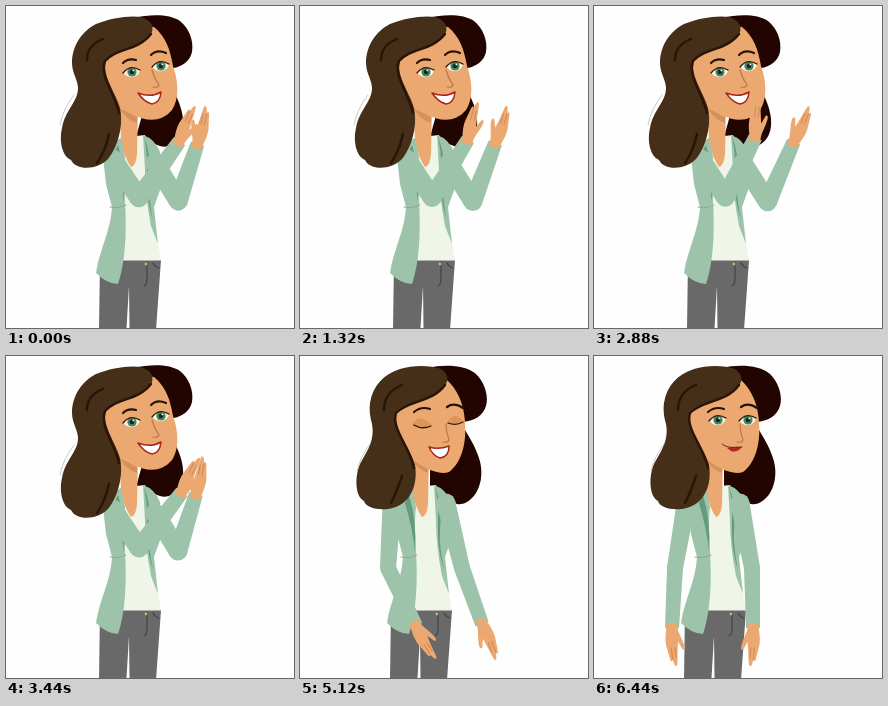
An HTML page for the animation above (6520 ms loop, 288 by 322 pixels).

```html
<!DOCTYPE html>
<html lang="en">
<head>
<meta charset="utf-8">
<title>Clapping woman</title>
<style>
  html, body { margin: 0; width: 100%; height: 100%; overflow: hidden; background: #fefefe; }
  svg { display: block; width: 100vw; height: 100vh; }
  .back { fill: #220500; }
  .hair { fill: #452f18; }
  .skin { fill: #eba870; }
  .jacket { fill: #9dc4aa; }
  .fold { fill: #649b7d; }
  .line { fill: none; stroke-linecap: round; stroke-linejoin: round; }
  .strand { stroke: #291407; stroke-width: 2.4; }
  .brow { stroke: #2a1206; stroke-width: 2.2; }
  .lash { stroke: #2b1a12; stroke-width: 1.3; }
  .crease { stroke: #bd7647; stroke-width: 1.2; }
  .seam { stroke: #8baa94; stroke-width: 1; }
  .grin { fill: #fff; stroke: #a9241c; stroke-width: 1.5; stroke-linejoin: round; }
</style>
</head>
<body>
<svg viewBox="0 0 288 322" preserveAspectRatio="none">
  <defs>
    <g id="eye">
      <path d="M-9,1 Q-2,-7 8,-1 Q5,6 -2,5 Q-6,4 -9,1Z" fill="#f6f7ef"/>
      <circle r="4.6" fill="#42865e"/>
      <circle r="2.3" fill="#14251c"/>
      <circle cx="1.4" cy="-1.6" r=".9" fill="#fff"/>
      <path class="line lash" d="M-9,1 Q-2,-8 8,-2"/>
    </g>
    <g id="hand">
      <path class="skin" d="M-5,5 C-6,-3 -8,-9 -7,-17 L-4,-31 Q-3,-35 -1.5,-32 L0,-37 Q2,-40 3,-36 L4,-23 L5,-14 L9,-22 Q12,-23 11,-18 C9,-9 5,-5 5,5Z"/>
      <path class="line crease" d="M-1.5,-31 L-2,-20 M2,-30 L1.5,-20" style="stroke-width:.6"/>
    </g>
  </defs>

  <g id="clapBack" class="back">
    <path d="M128,12 C144,8 164,8 174,15 C183,22 188,35 186,46 C184,55 176,61 167,62 L146,26Z"/>
    <path d="M140,95 L168,86 C178,104 180,122 173,132 C167,140 160,142 154,140 L130,131Z"/>
  </g>
  <g id="restBack" class="back">
    <path d="M128,12 C144,8 166,9 176,18 C184,26 189,39 186,50 C183,60 174,65 162,66 L146,26Z"/>
    <path d="M160,66 C172,85 184,104 181,122 C179,139 167,150 157,148 C142,143 132,140 130,130 L130,95Z"/>
  </g>

  <g id="body">
    <path d="M94,254 H155 L150,324 H93Z" fill="#69696a"/>
    <path d="M123,280 L120.500,322 H123.500Z" fill="#fefefe"/>
    <path class="line" d="M141,256 V272 Q141,279 138,280 M147,257 Q149,261 153,262" stroke="#41444c" stroke-width="1.2"/>
    <circle cx="140" cy="258" r="1.4" fill="#c9b66b"/>
    <path d="M113,132 L139,129 L150,160 L146,204 L155,254.500 H117 L110,170Z" fill="#eff5e9"/>
    <path class="skin" d="M113,90 L132,100 L131,148 Q130,160 125,161 Q118,151 115,135Z"/>
    <path d="M114,96 Q122,108 131,111 V117 Q121,114 114,103Z" fill="#d6905b"/>
    <path class="jacket" d="M115,132 C106,137 98,141 97,151 L100,178 L106,201 C105,224 93,245 90,267 Q101,278 112,278 C119,258 121,228 119,196 Q117,164 119,151Z"/>
    <path class="jacket" d="M137,129 Q149,133 154,146 L157,176 L148,201 L152,238 L145,220 Q139,190 139,164Z"/>
    <path class="fold" d="M138,131 Q146,150 143,174 Q142,190 147,214 Q140,194 141,166 Q142,148 138,131Z M112,139 Q120,165 118,196 Q116,174 108,147Z"/>
    <path class="line seam" d="M104,201 Q112,203 120,199"/>
  </g>

  <g id="farArm"></g>
  <g id="nearArm"></g>

  <g id="clapHead">
    <path class="skin" d="M92,56 C108,28 138,18 148,21 C160,31 164,43 167,60 C173,77 173,93 166,104 C156,116 141,116 128,109 L108,100Z"/>
    <path class="line brow" d="M117,57 Q122,52 130,54 M145,49 Q151,43 160,47"/>
    <use href="#eye" x="126" y="66"/>
    <use href="#eye" x="155" y="60"/>
    <path class="line crease" d="M146,64 Q148,72 153,79 Q152,82 147,81"/>
    <path class="grin" d="M132,87 Q145,92 155,86 Q154,97 146,98 Q138,96 132,87Z"/>
    <path class="hair" d="M146,26 C134,44 113,42 101,53 C94,67 109,85 114,102 C118,121 111,142 102,153 C92,164 70,165 65,154 C56,150 53,135 56,122 C59,104 72,96 72,82 C72,74 66,67 66,57 C66,40 76,25 90,18 C104,12 124,9 135,11 C144,14 148,19 146,26Z"/>
    <path class="line strand" d="M145,28 C132,45 110,42 99,55 C93,69 109,88 113,107 M81,54 Q81,39 97,33 M103,128 Q99,146 91,157"/>
    <path class="line" d="M54,119 Q57,103 68,89" stroke="#aaa79f" stroke-width=".6"/>
  </g>
  <g id="restHead">
    <path class="skin" d="M92,57 C108,30 135,20 146,23 C158,34 164,48 165,66 C167,90 160,108 149,116 C137,120 122,110 113,104 L104,90Z"/>
    <path class="line brow" d="M114,56 Q121,50 130,53 M147,51 Q154,46 163,52"/>
    <g id="openEyes">
      <use href="#eye" x="124" y="64"/>
      <use href="#eye" x="154" y="64"/>
    </g>
    <g id="closedEyes">
      <path d="M112,70 Q119,55 131,69 Q122,74 112,70Z M147,67 Q154,54 163,65 Q155,70 147,67Z" fill="#df9457"/>
      <path class="line lash" d="M114,69 Q122,74 131,70 M148,67 Q156,70 163,66"/>
    </g>
    <path class="line crease" d="M146,68 Q146,76 149,84 Q148,87 143,86"/>
    <path id="grin" class="grin" d="M129,91 Q139,94 149,90 Q149,101 140,102 Q133,100 129,91Z"/>
    <g id="smile">
      <path d="M133,92 Q140,90 148,91 Q143,97 137,95Z" fill="#ad2a22"/>
      <path class="line" d="M128,88 Q133,93 148,91" stroke="#7c261b" stroke-width="1"/>
    </g>
    <path class="hair" d="M146,28 C133,46 110,43 97,55 C91,72 109,88 115,109 C118,128 111,141 103,147 C90,157 66,154 64,145 C54,140 55,117 61,106 C68,94 75,83 72,68 C70,61 69,54 70,47 C73,29 84,18 100,13 C113,9 130,9 141,13 C147,17 149,22 146,28Z"/>
    <path class="line strand" d="M145,29 C132,47 108,44 96,57 C91,73 110,91 114,112 M84,54 Q84,36 102,29 M102,120 Q96,138 91,147"/>
    <path class="line" d="M57,115 Q60,101 70,88" stroke="#aaa79f" stroke-width=".6"/>
  </g>

  <use id="farHand" href="#hand"/>
  <use id="nearHand" href="#hand"/>
</svg>
<script>
const LOOP = 6520, HOLD = 160, CLAP = 340, CLAP_CLOSED = 40, CLAP_END = 4960;
const $ = id => document.getElementById(id);

// Arm pose: shoulder x y, elbow x y, wrist x y, hand angle from upright.
const near = {
  closed: [107, 153, 133, 192, 176, 136, 25],
  open: [107, 153, 131, 191, 158, 130, -2],
  swing: [100, 150, 90, 208, 125, 228, 105],
  low: [92, 148, 88, 212, 116, 270, 151],
  rest: [92, 148, 81, 212, 78, 272, 176]
};
const far = {
  closed: [149, 157, 172, 195, 190, 138, 12],
  open: [149, 157, 174, 196, 202, 135, 29],
  swing: [149, 154, 190, 193, 235, 177, 110],
  low: [146, 147, 162, 212, 182, 268, 157],
  rest: [146, 147, 158, 212, 159, 272, 182]
};

const mix = (a, b, k) => a.map((v, i) => v + (b[i] - v) * k);
const ease = k => k * k * (3 - 2 * k);
const show = (id, on) => $(id).style.display = on ? "" : "none";
const clapOpen = t => (1 - Math.cos((t - CLAP_CLOSED) / CLAP * 2 * Math.PI)) / 2;

function armPose(arm, t) {
  const open = t < HOLD ? clapOpen(0) : clapOpen(Math.min(t, CLAP_END));
  const start = mix(arm.closed, arm.open, open);
  if (t <= CLAP_END) return start;
  const keys = [[CLAP_END, start], [5040, arm.swing], [5120, arm.low], [5400, arm.rest]];
  for (let i = 1; i < keys.length; i++) {
    const [t0, a] = keys[i - 1], [t1, b] = keys[i];
    if (t < t1) return mix(a, b, ease((t - t0) / (t1 - t0)));
  }
  return arm.rest;
}

function limb(x0, y0, x1, y1, w0, w1) {
  const d = Math.hypot(x1 - x0, y1 - y0) || 1;
  const nx = (y0 - y1) / d / 2, ny = (x1 - x0) / d / 2;
  const points = [[x0 + nx * w0, y0 + ny * w0], [x1 + nx * w1, y1 + ny * w1],
                  [x1 - nx * w1, y1 - ny * w1], [x0 - nx * w0, y0 - ny * w0]];
  return `<polygon class="jacket" points="${points.join(" ")}"/>`;
}

const joint = (x, y, r) => `<circle class="jacket" cx="${x}" cy="${y}" r="${r}"/>`;

function drawArm(name, [sx, sy, ex, ey, wx, wy, angle]) {
  const raised = wy < ey;
  const elbow = raised ? 19 : 16;
  $(name + "Arm").innerHTML =
    joint(sx, sy, 9.5) + limb(sx, sy, ex, ey, 19, elbow) +
    joint(ex, ey, elbow / 2) + limb(ex, ey, wx, wy, elbow, 14);
  const flip = (name === "far") === raised ? -1 : 1;
  $(name + "Hand").setAttribute("transform",
    `translate(${wx} ${wy}) rotate(${angle}) scale(${flip} 1)`);
}

function draw(t) {
  const clapping = t < CLAP_END + 40;
  const blinking = t < 5280;
  const grinning = t < 5400;
  for (const part of ["Back", "Head"]) {
    show("clap" + part, clapping);
    show("rest" + part, !clapping);
  }
  show("openEyes", !blinking);
  show("closedEyes", blinking);
  show("grin", grinning);
  show("smile", !grinning);
  $("body").setAttribute("transform", `translate(${clapping ? 0 : -3} 0)`);
  drawArm("far", armPose(far, t));
  drawArm("near", armPose(near, t));
}

const began = performance.now();
function tick() {
  draw((performance.now() - began) % LOOP);
  requestAnimationFrame(tick);
}
tick();
</script>
</body>
</html>
```
